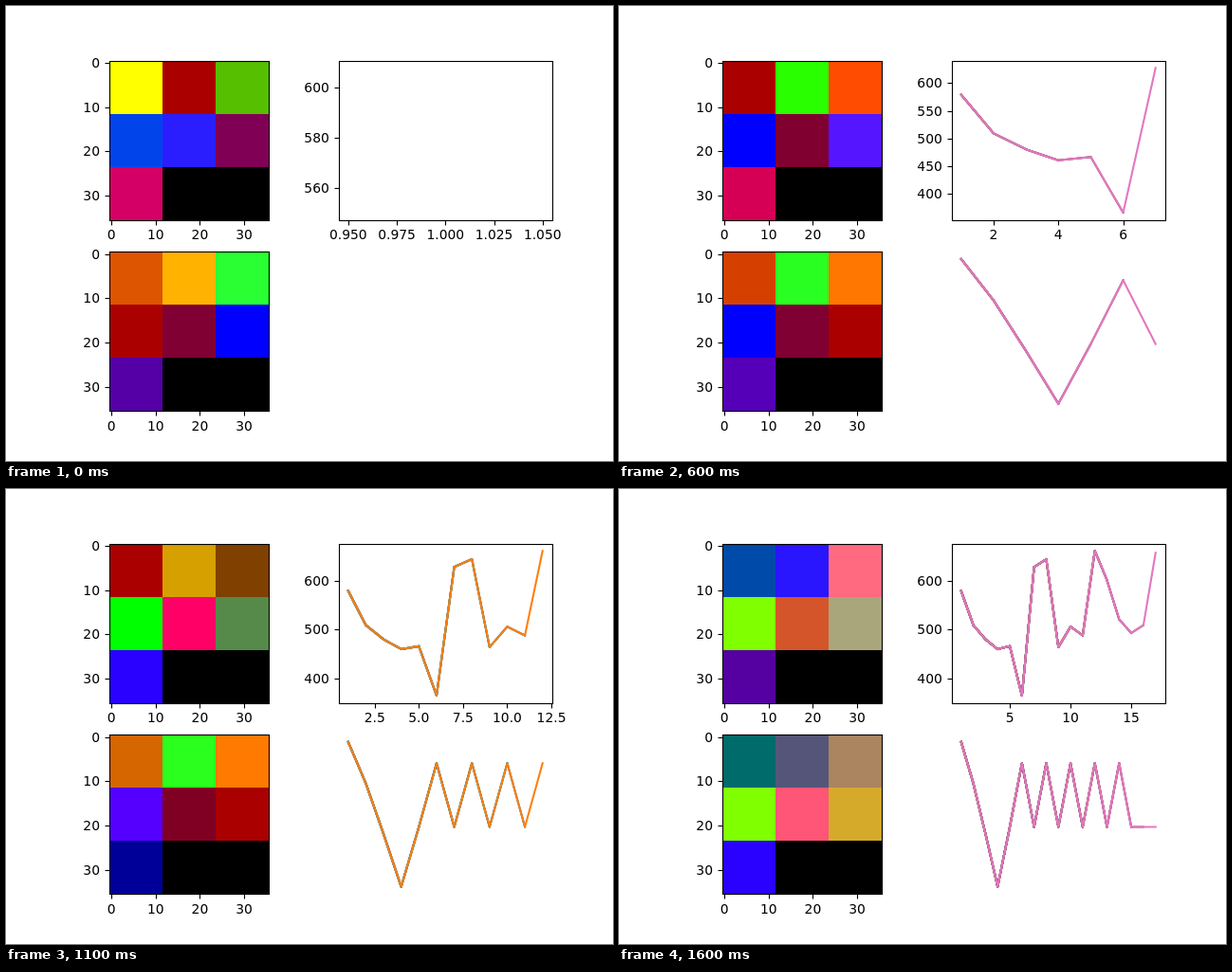
Write an HTML page that moves like this. It is 640 px wide and 480 px high and loops after 1.7 s.

```html
<!DOCTYPE html>
<html lang="en">
<head>
<meta charset="utf-8">
<title>Grids and scores</title>
<style>
  html, body { margin: 0; width: 100%; height: 100%; overflow: hidden; background: #fff; }
  svg { display: block; width: 640px; height: 480px; }
  text { font: 13.889px "DejaVu Sans", sans-serif; fill: #000; }
  .x { text-anchor: middle; }
  .y { text-anchor: end; }
  .axis { fill: none; stroke: #000; stroke-width: 1.11; }
  .cell { shape-rendering: crispEdges; }
  polyline { fill: none; stroke-width: 2.083; stroke-linejoin: round; stroke-linecap: square; }
</style>
</head>
<body>
<svg viewBox="0 0 640 480">
  <g id="cells"></g>
  <g id="lines"></g>
  <g id="axes"></g>
  <g id="frames"></g>
</svg>
<script>
const STEP = 100, COUNT = 17;
const TAB10 = ['#1f77b4', '#ff7f0e', '#2ca02c', '#d62728', '#9467bd',
               '#8c564b', '#e377c2', '#7f7f7f', '#bcbd22', '#17becf'];

// Seven coloured cells per grid; the last two stay black.
const upper = [
  [0, 'ff0 a00 55bf00 0044ea 2a1eff 800055 d50066'],
  [2, 'ffd500 00c04a a00 5f0 2a2aff 800055 d50066'],
  [4, 'ff0 80002a a00 004cff 2b8a5c 552a77 d50055'],
  [6, 'a00 2aff00 ff4c00 00f 80002f 5515ff d50055'],
  [10, 'a00 d5a000 804000 0f0 ff0066 558a4a 2a00ff'],
  [13, '2aff00 554080 802400 ff3c3c 00f d500bf a00'],
  [16, '004aaa 2a15ff ff6a80 80ff00 d5552a aaa67c 5500a0']
];
const even = 'd54000 2aff22 f70 00f 800033 a00 5500b8';
const odd = 'd56600 2aff1d ff7a00 50f 800024 a00 000099';
const lower = [
  [0, 'd50 ffb300 2aff33 a00 800033 00f 5500a6'],
  [2, 'd57000 804000 2aff55 004a70 f0a a00 50f'],
  ...Array.from({ length: 12 }, (_, i) => [i + 4, i % 2 && i < 11 ? odd : even]),
  [16, '006b6b 55557a aa8560 80ff00 f57 d5aa2a 2a00ff']
];

const score = [579, 509, 480, 460, 466, 365, 628, 644, 464, 506, 488, 661, 601, 521, 493, 509, 657];
const trend = [0, -43.8, -97, -152.7];
for (let i = 4; i < COUNT; i++) trend.push(i % 2 && i < 14 ? -22.4 : -89.7);

const LEFT = 350.55, WIDTH = 225.45, HEIGHT = 168, TOP1 = 57.6, TOP2 = 259.2, IMG = 108.73;
const $ = id => document.getElementById(id);
const snap = v => Math.floor(v + 0.5) + 0.5;

// View limits: 5% margin, with flat data widened first.
function limits(data) {
  let lo = Math.min(...data), hi = Math.max(...data);
  if (lo === hi) { lo *= 0.95; hi *= 1.05; }
  const pad = (hi - lo) * 0.05;
  return [lo - pad, hi + pad];
}

function ticks([lo, hi], bins) {
  const raw = (hi - lo) / bins;
  const pow = 10 ** Math.floor(Math.log10(raw));
  const step = +([1, 2, 2.5, 5, 10].find(m => m * pow >= raw) * pow).toPrecision(3);
  const digits = (String(step).split('.')[1] || '').length;
  const out = [];
  for (let i = Math.ceil(lo / step); i * step <= hi; i++) out.push([i * step, (i * step).toFixed(digits)]);
  return out;
}

const scale = ([lo, hi], from, to) => v => from + (v - lo) / (hi - lo) * (to - from);

function xTick(x, bottom, label) {
  const b = snap(bottom);
  return `<path class="axis" d="M${snap(x)} ${b}v5"/>` +
    `<text class="x" x="${x.toFixed(2)}" y="${Math.round(bottom + 20.3)}">${label}</text>`;
}

function yTick(left, y, label) {
  return `<path class="axis" d="M${snap(left)} ${snap(y)}h-5"/>` +
    `<text class="y" x="${left - 9.72}" y="${Math.round(y + 5)}">${label}</text>`;
}

function box(left, top, width) {
  const x = snap(left), y = snap(top);
  return `<rect class="axis" x="${x}" y="${y}" width="${snap(left + width) - x}" height="${snap(top + HEIGHT) - y}"/>`;
}

function grid(keys, n, top) {
  const colors = keys.filter(k => k[0] <= n).pop()[1].split(' ');
  let out = '';
  for (let i = 0; i < 9; i++) {
    out += `<rect class="cell" x="${109 + i % 3 * 56}" y="${top + Math.floor(i / 3) * 56}" ` +
      `width="56" height="56" fill="#${colors[i] || '000'}"/>`;
  }
  return out;
}

// Each step lays a longer line over all the earlier ones.
function plot(data, n, sx, sy) {
  const pts = data.slice(0, n + 1).map((v, i) => sx(i + 1).toFixed(2) + ',' + sy(v).toFixed(2));
  let out = '';
  for (let i = 1; i <= n; i++) {
    out += `<polyline points="${pts.slice(0, i + 1).join(' ')}" stroke="${TAB10[i % 10]}"/>`;
  }
  return out;
}

function draw(n) {
  const xs = limits([1, n + 1]);
  const ys = limits(score.slice(0, n + 1));
  const sx = scale(xs, LEFT, LEFT + WIDTH);
  const sy = scale(ys, TOP1 + HEIGHT, TOP1);
  $('cells').innerHTML = grid(upper, n, 58) + grid(lower, n, 259);
  $('lines').innerHTML = plot(score, n, sx, sy) +
    (n ? plot(trend, n, sx, scale(limits(trend.slice(0, n + 1)), TOP2 + HEIGHT, TOP2)) : '');
  $('axes').innerHTML =
    ticks(xs, 5).map(([v, s]) => xTick(sx(v), TOP1 + HEIGHT, s)).join('') +
    ticks(ys, 6).map(([v, s]) => yTick(LEFT, sy(v), s)).join('');
}

let fixed = box(LEFT, TOP1, WIDTH);
for (const top of [TOP1, TOP2]) {
  fixed += box(IMG, top, HEIGHT);
  for (let v = 0; v < 36; v += 10) {
    const d = (v + 0.5) * HEIGHT / 36;
    fixed += xTick(IMG + d, top + HEIGHT, v) + yTick(IMG, top + d, v);
  }
}
$('frames').innerHTML = fixed;

let shown = 0;
draw(0);
const start = performance.now();
function loop() {
  const n = Math.floor((performance.now() - start) / STEP) % COUNT;
  if (n !== shown) draw(shown = n);
  requestAnimationFrame(loop);
}
requestAnimationFrame(loop);
</script>
</body>
</html>
```
